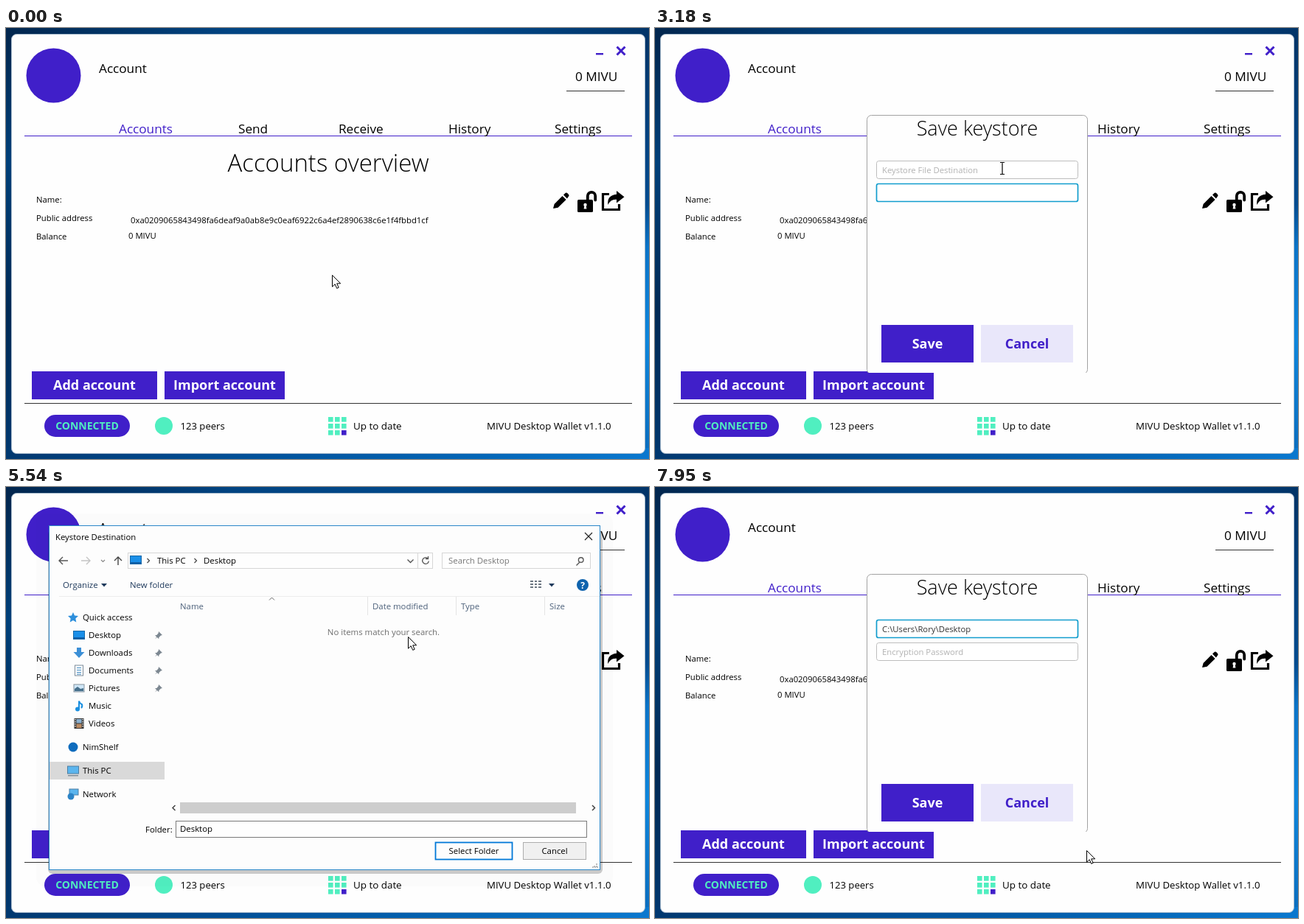
An HTML page for the animation above (7990 ms loop, 872 px wide and 585 px high).

```html
<!DOCTYPE html>
<html lang="en">
<head>
<meta charset="utf-8">
<title>Save keystore</title>
<style>
  html, body { margin: 0; width: 100%; height: 100%; overflow: hidden; background: #02305f; }
  svg { display: block; width: 100%; height: 100%; }
  text { font-family: "Open Sans", "Noto Sans", sans-serif; white-space: pre; }
</style>
</head>
<body>
<svg id="stage" viewBox="0 0 872 585" xmlns="http://www.w3.org/2000/svg"></svg>
<script>
const LOOP = 7990;
const PURPLE = '#401fc9', MINT = '#50efc0', BLUE = '#0078d7', NAVY = '#1e395b';

// Markup helpers
const text = (x, y, s, size = 11.3, fill = '#000', extra = '') =>
  `<text x="${x}" y="${y}" font-size="${size}" fill="${fill}" ${extra}>${s}</text>`;
const rect = (x, y, w, h, fill, extra = '') =>
  `<rect x="${x}" y="${y}" width="${w}" height="${h}" fill="${fill}" ${extra}/>`;
const disc = (x, y, r, fill) => `<circle cx="${x}" cy="${y}" r="${r}" fill="${fill}"/>`;
const fillPath = (d, fill = '#000', extra = '') => `<path d="${d}" fill="${fill}" ${extra}/>`;
const line = (d, stroke, w = 1, extra = '') =>
  `<path d="${d}" fill="none" stroke="${stroke}" stroke-width="${w}" ${extra}/>`;
const group = (id, body, extra = '') => `<g id="${id}" ${extra}>${body}</g>`;
const MIDDLE = 'text-anchor="middle"';
const BOLD = MIDDLE + ' font-weight="700"';
const LIGHT = MIDDLE + ' font-weight="300"';

function gradient(id, dir, ...stops) {
  const end = dir === 'x' ? 'x2="1" y2="0"' : 'x2="0" y2="1"';
  return `<linearGradient id="${id}" ${end}>` +
    stops.map(([at, c]) => `<stop offset="${at}" stop-color="${c}"/>`).join('') + '</linearGradient>';
}

function desktop() {
  return '<defs>' +
    gradient('top', 'x', [0, '#02264e'], [.35, '#014482'], [.7, '#014a8c'], [1, '#023468']) +
    gradient('left', 'y', [0, '#02264e'], [.3, '#014079'], [.65, '#012a55'], [1, '#01386f']) +
    gradient('right', 'y', [0, '#023468'], [.4, '#034c90'], [.5, '#0b74c8'], [.72, '#0e86dc'], [1, '#0a6cbd']) +
    gradient('bottom', 'x', [0, '#01386f'], [.4, '#01529b'], [.75, '#0467b8'], [1, '#0a78cf']) +
    '<clipPath id="cut"><rect x="280" y="110" width="320" height="358"/></clipPath></defs>' +
    rect(0, 0, 872, 20, 'url(#top)') + rect(0, 9, 20, 576, 'url(#left)') +
    rect(852, 9, 20, 576, 'url(#right)') + rect(0, 570, 872, 15, 'url(#bottom)') +
    rect(7.5, 8.5, 859, 569, '#fefefe', 'rx="7" stroke="#a9bccd"');
}

function actionIcons() {
  return fillPath('M742 245L743.6 239L754.5 228L759.6 233.1L748.6 243.8ZM756 226.6L758.6 224Q760 223 761.4 224.3L763 226Q764 227.4 763 228.6L760.9 231.4Z') +
    rect(775, 233, 21, 17, '#000', 'rx="1.6"') +
    line('M788.8 234V228a5.2 5.2 0 0 1 10.4 0V233.5', '#000', 3.8, 'stroke-linecap="round"') +
    disc(785.5, 240, 2.2, '#fff') + fillPath('M784.6 240h1.8l1 5.5h-3.8z', '#fff') +
    line('M818 225.5H809.5V246.5H831.5V239', '#000', 3.2) +
    fillPath('M828 221L838.5 229.3L828 237.6V232.8Q820 232 816.4 240Q814.6 227.4 828 225.8Z');
}

function wallet() {
  const tabs = [['Accounts', 153, PURPLE], ['Send', 315], ['Receive', 451], ['History', 600], ['Settings', 744]];
  let out = disc(64.5, 64.5, 37, PURPLE) + text(126, 61, 'Account', 17.2) +
    rect(800, 34, 10, 2.4, PURPLE) + line('M828.5 25.5L839.5 36.5M839.5 25.5L828.5 36.5', PURPLE, 3) +
    text(772, 72, '0 MIVU', 17.2) + rect(760, 85, 79, 1, '#333') + rect(25, 146, 824, 1, PURPLE);
  for (const [name, x, c] of tabs) out += text(x, 143, name, 17.2, c);
  out += text(437, 195, 'Accounts overview', 33, '#000', LIGHT) +
    text(41, 237, 'Name:') + text(41, 262, 'Public address') + text(41, 287, 'Balance') +
    text(169, 265, '0xa0209065843498fa6deaf9a0ab8e9c0eaf6922c6a4ef2890638c6e1f4fbbd1cf') +
    text(166, 286, '0 MIVU') + actionIcons() +
    rect(35, 466, 170, 38, PURPLE) + text(120, 491, 'Add account', 18, '#fff', BOLD) +
    rect(215, 466, 163, 38, PURPLE) + text(296.5, 491, 'Import account', 18, '#fff', BOLD) +
    rect(25, 509, 824, 1, '#333') +
    rect(52, 525, 116, 30, PURPLE, 'rx="15"') + text(110, 545, 'CONNECTED', 14, MINT, BOLD) +
    disc(214, 540, 12, MINT) + text(236.5, 545, '123 peers', 13.1);
  for (let i = 0; i < 9; i++)
    out += rect(437 + i % 3 * 9, 528 + Math.floor(i / 3) * 9, 6.6, 6.6, i === 8 ? PURPLE : MINT);
  return out + text(471, 545, 'Up to date', 13.4) + text(652, 545, 'MIVU Desktop Wallet v1.1.0', 13.2);
}

function saveBox() {
  const field = y => rect(300.5, y + .5, 273, 24, '#fff', 'rx="3" stroke="#bdbdbd"');
  const focus = y => rect(300.5, y + .5, 273, 24, '#fff', 'rx="2.5" stroke="#129dcd" stroke-width="1.7"');
  return rect(287.5, 118.5, 299, 351, '#fefefe', 'rx="6" stroke="#a2a2a2" clip-path="url(#cut)"') +
    text(437, 146, 'Save keystore', 27, '#000', LIGHT) + field(180) + field(211) +
    group('focus1', focus(180)) + group('focus2', focus(211)) +
    group('prompt1', text(308, 197, 'Keystore File Destination', 11.3, '#b2b2b2')) +
    group('prompt2', text(308, 228, 'Encryption Password', 11.3, '#b2b2b2')) +
    group('chosen', text(308, 197, 'C:\\Users\\Rory\\Desktop', 11.3, '#333')) +
    group('caret', rect(307, 215, 1, 17, '#000')) +
    rect(307, 403, 125, 51, PURPLE) + text(369.5, 435, 'Save', 18, '#fff', BOLD) +
    rect(442, 403, 125, 51, '#e9e7fa') + text(504.5, 435, 'Cancel', 18, PURPLE, BOLD);
}

// Sidebar icons, centred on x, y
const icons = {
  star: (x, y) => fillPath(`M${x} ${y - 7}l2 4.6 5 .5-3.7 3.4 1 5-4.3-2.6-4.3 2.6 1-5-3.7-3.4 5-.5z`, '#2d8fdc'),
  screen: (x, y) => rect(x - 7.5, y - 5.5, 15, 11, '#1a8fe8', 'stroke="#1467a8"') + rect(x - 7, y + 3, 14, 2, '#0d5ea6'),
  down: (x, y) => fillPath(`M${x - 3} ${y - 7}h6v6h4.5l-7.5 8-7.5-8h4.5z`, '#3b8fd6'),
  page: (x, y) => rect(x - 5.5, y - 7, 11, 14, '#fff', 'stroke="#7c8b99"') +
    line(`M${x - 3} ${y - 3.5}h6m-6 3h6m-6 3h6m-6 2.5h6`, '#3a86c0', 1.2),
  photo: (x, y) => rect(x - 7, y - 5, 14, 10, '#cfe7f8', 'stroke="#86929c"') +
    fillPath(`M${x - 6} ${y + 4}v-3l4-3 4 3 4-1v4z`, '#47708c'),
  note: (x, y) => disc(x - 2, y + 4.5, 3, '#1a8fe0') +
    line(`M${x} ${y + 4.5}v-11q1 3.500 4 4.500 1 3-1 5`, '#1a8fe0', 2),
  film: (x, y) => rect(x - 6.5, y - 7, 13, 14, '#333') + rect(x - 3.5, y - 6, 7, 5.5, '#8ab0cf') +
    rect(x - 3.5, y + .5, 7, 5.5, '#b98a62') + line(`M${x - 5} ${y - 6}v12m10-12v12`, '#fff', 1.2, 'stroke-dasharray="1.5 1.5"'),
  dot: (x, y) => disc(x, y, 6.5, '#0f6cbd'),
  computer: (x, y) => rect(x - 7.5, y - 6, 15, 10, '#5bb5ee', 'stroke="#4c7ea3"') + rect(x - 7, y + 6, 14, 1.4, '#7d8b96'),
  network: (x, y) => rect(x - 5, y - 7, 12, 8, '#5bb5ee', 'stroke="#4c7ea3"') + disc(x - 3, y + 3, 4.5, '#2c84c7')
};

function sidebar() {
  const items = [['star', 'Quick access', 177], ['screen', 'Desktop', 201, 1], ['down', 'Downloads', 225, 1],
    ['page', 'Documents', 249, 1], ['photo', 'Pictures', 273, 1], ['note', 'Music', 297, 0], ['film', 'Videos', 321, 0],
    ['dot', 'NimShelf', 353], ['computer', 'This PC', 385], ['network', 'Network', 417]];
  return rect(59, 373, 156, 24, '#d9d9d9') + items.map(([icon, name, y, pin]) => {
    const nested = pin !== undefined;
    return icons[icon](nested ? 99 : 91, y) + text(nested ? 112 : 104, y + 4, name, 11.4) +
      (pin ? fillPath(`M207 ${y - 5}l5 5-2 .5-2.500 2.500-.3 2.300-2.200-2.200-3 2.400 2.300-3.100-2.300-2.200 2.400-.3 2.300-2.700z`, '#7c8791') : '');
  }).join('');
}

function browser() {
  const chevron = (x, y, c = '#444') => line(`M${x - 1.5} ${y - 3}l3 3-3 3`, c, 1.2);
  const box = (x, y, w, h, stroke, fill = '#fefefe') => rect(x + .5, y + .5, w - 1, h - 1, fill, `stroke="${stroke}"`);
  const heading = (x, s) => text(x, 166, s, 11.4, '#4c607a');
  const arrow = (x, c, d) => line(`M${x - 6} 100h12M${d < 0 ? x - 1 : x + 1} 95l${d * 5} 5 ${-d * 5} 5`, c, 1.4);

  const frame = rect(41, 36, 782, 506, '#000', 'opacity=".012" rx="12"') +
    rect(57, 58, 752, 467, '#000', 'opacity=".2" rx="6"') + box(58, 52, 748, 468, '#2a86c8', '#fdfdfd') +
    text(67, 72, 'Keystore Destination', 11.3) + line('M785 62l10 10m0-10l-10 10', '#222', 1.2) +
    arrow(78, '#555', -1) + arrow(108, '#c4c4c4', 1) + line('M129 99l2.500 2.500 2.500-2.500', '#888', 1.2) +
    line('M152 106v-11m-5 5l5-5 5 5', '#444', 1.4) +
    box(165, 89, 394, 22, '#d6d6d6') + box(558, 89, 21, 22, '#d6d6d6') + icons.screen(176, 99) +
    chevron(193, 100) + text(205, 104, 'This PC', 11.4) + line('M544.500 98.500l4 4 4-4', '#555', 1.4) +
    line('M572 97a4.300 4.300 0 1 0 1.300 3.500M572.500 94v3.500h-3.500', '#555', 1.3) +
    box(591, 89, 202, 22, '#d6d6d6') + line('M777.500 102.500l-4 4M783 99a3.300 3.300 0 1 1-6.600 0a3.300 3.300 0 1 1 6.600 0', '#555', 1.4) +
    text(77, 137, 'Organize', 11.4, NAVY) + fillPath('M129 131h8l-4 4.500z', NAVY) +
    line('M711 128h4m2 0h3m2 0h4m-15 4h4m2 0h3m2 0h4m-15 4h4m2 0h3m2 0h4', '#6d7782', 2) + fillPath('M736 131h8l-4 4.500z', NAVY) +
    disc(782, 133, 8, '#0f63ad') + text(782, 137.500, '?', 12, '#fff', BOLD) +
    rect(72, 148, 733, 1, '#ececec') + sidebar() + text(189, 469, 'Folder:', 11.4) +
    group('select', box(582, 482, 105, 24, BLUE)) + text(634.500, 498, 'Select Folder', 11.4, '#000', MIDDLE) +
    box(701, 482, 86, 24, '#adadad', '#f0f0f0') + text(744, 498, 'Cancel', 11.4, '#000', MIDDLE) +
    line('M801 511v2m0 1v2m-3-2v2m-3 0m0-0v0M795 516h2m1 0h2m1 0h2', '#aaa', 1.6);

  const loading = text(600, 104, 'Search This PC', 11.4, '#777') +
    text(511, 176, 'Working on it...', 11.4, '#6d6d6d', MIDDLE) + rect(788, 166, 16, 204, '#cdcdcd') +
    box(230, 453, 558, 23, BLUE) + group('folderCaret', rect(236, 457, 1, 14, '#000'));

  const loaded = text(268, 104, 'Desktop', 11.4) + text(600, 104, 'Search Desktop', 11.4, '#777') +
    text(168, 137, 'New folder', 11.4, NAVY) +
    heading(236, 'Name') + heading(497, 'Date modified') + heading(617, 'Type') + heading(737, 'Size') +
    [490, 610, 730].map(x => rect(x, 149, 1, 25, '#e5e5e5')).join('') + line('M357 153.500l3.500-3.500 3.500 3.500', '#666') +
    text(512, 201, 'No items match your search.', 11.4, '#6d6d6d', MIDDLE) +
    rect(236, 428, 537, 15, '#cdcdcd') +
    line('M229.500 432l-3.500 3.500 3.500 3.500M795 432l3.500 3.500-3.500 3.500', '#444', 1.500) +
    group('folderBox', box(230, 453, 558, 23, '#7a7a7a')) + text(236, 468, 'Desktop', 11.4);

  return frame + group('crumb', chevron(257, 100)) + group('loading', loading) + group('loaded', loaded);
}

function pointers() {
  return group('arrow', fillPath('M.5 .5V16.200L4.200 12.700L6.700 18.400L9.200 17.300L6.700 11.800H11.700Z', '#fff', 'stroke="#000"')) +
    group('hand', fillPath('M-1.500 14V2Q-1.500 .5 0 .5T1.700 2V8Q2.500 6.800 4.200 7.300L4.800 8.600Q6.500 7.700 7.600 9Q8.300 9.200 8.500 10Q11.500 9 11.500 12V16Q11.500 18.500 9.500 21V23.500H-.5V21.500Q-3 18.500-5.500 15Q-6 12-3.800 12Z', '#fff', 'stroke="#000"') +
      line('M1.700 8v4M4.800 8.600v3.800M8.200 9.800v3', '#000')) +
    group('beam', line('M-3 -7.500h2.500l.5 .5.500-.5h2.500M0 -7V8M-3 8.500h2.500l.5-.5.500.5h2.500', '#000', 1.2));
}

const stage = document.getElementById('stage');
stage.innerHTML = desktop() + wallet() + group('saveBox', saveBox()) +
  group('browser', browser()) + group('pointer', pointers());
const el = {};
stage.querySelectorAll('[id]').forEach(node => el[node.id] = node);

// Pointer hotspot: time, x, y
const track = [[0, 442, 335], [310, 442, 335], [1100, 834, 244], [1130, 834, 244], [1160, 834, 242],
  [1400, 833, 241], [1430, 832, 241], [2180, 832, 241], [2970, 512, 191], [3000, 508, 191], [3180, 471, 190],
  [3740, 471, 190], [3741, 469, 189], [4430, 469, 189], [4980, 545, 203], [5540, 545, 203], [6330, 579, 432],
  [6360, 579, 432], [6850, 590, 508], [7100, 592, 502], [7810, 592, 502], [7950, 585, 493], [LOOP, 585, 493]];

function pointerAt(t) {
  const i = track.findIndex(step => step[0] > t);
  const [t0, x0, y0] = track[i - 1], [t1, x1, y1] = track[i];
  const q = (t - t0) / (t1 - t0), e = q * q * (3 - 2 * q);
  return [x0 + (x1 - x0) * e, y0 + (y1 - y0) * e];
}

const show = (id, on) => el[id].setAttribute('display', on ? 'inline' : 'none');
const within = (t, from, to) => t >= from && t < to;

function zoomBrowser(t) {
  let opacity = 1, scale = 1;
  if (t < 4000) {
    const rest = Math.pow(1 - (t - 3730) / 270, 2.5);
    opacity = 1 - rest;
    scale = 1 - .052 * rest;
  } else if (t > 7400) {
    const q = (t - 7400) / 150;
    opacity = 1 - q;
    scale = 1 - .035 * q;
  }
  el.browser.setAttribute('opacity', opacity);
  el.browser.setAttribute('transform', `translate(431.5 286) scale(${scale}) translate(-431.5 -286)`);
}

function render(t) {
  const [x, y] = pointerAt(t);
  const editing = t < 3550, done = t >= 7260, navigated = t >= 5150;
  show('saveBox', t >= 1660);
  show('focus2', editing);
  show('prompt2', !editing);
  show('caret', editing && Math.floor((t - 1680) / 500) % 2 === 0);
  show('focus1', done);
  show('chosen', done);
  show('prompt1', !done);

  const open = within(t, 3730, 7550);
  show('browser', open);
  if (open) zoomBrowser(t);
  show('crumb', t >= 4190);
  show('loading', !navigated);
  show('loaded', navigated);
  show('folderCaret', !within(t, 4280, 4810));
  const overField = navigated && y > 453 && y < 476;
  el.folderBox.firstChild.setAttribute('stroke', overField ? '#171717' : '#7a7a7a');
  const overSelect = t > 6360 && y >= 482 && y < 506;
  const button = el.select.firstChild;
  button.setAttribute('fill', within(t, 7260, 7350) ? '#cce4f7' : overSelect ? '#d9eaf8' : '#fdfdfd');
  button.setAttribute('stroke-width', overSelect ? 1 : 1.8);

  const hand = within(t, 1130, 1660);
  const beam = within(t, 2180, 3740) && x < 574;
  show('hand', hand);
  show('beam', beam);
  show('arrow', !hand && !beam);
  el.pointer.setAttribute('transform', `translate(${Math.round(x)} ${Math.round(y)})`);
}

function tick() {
  render(performance.now() % LOOP);
  requestAnimationFrame(tick);
}
tick();
</script>
</body>
</html>
```
